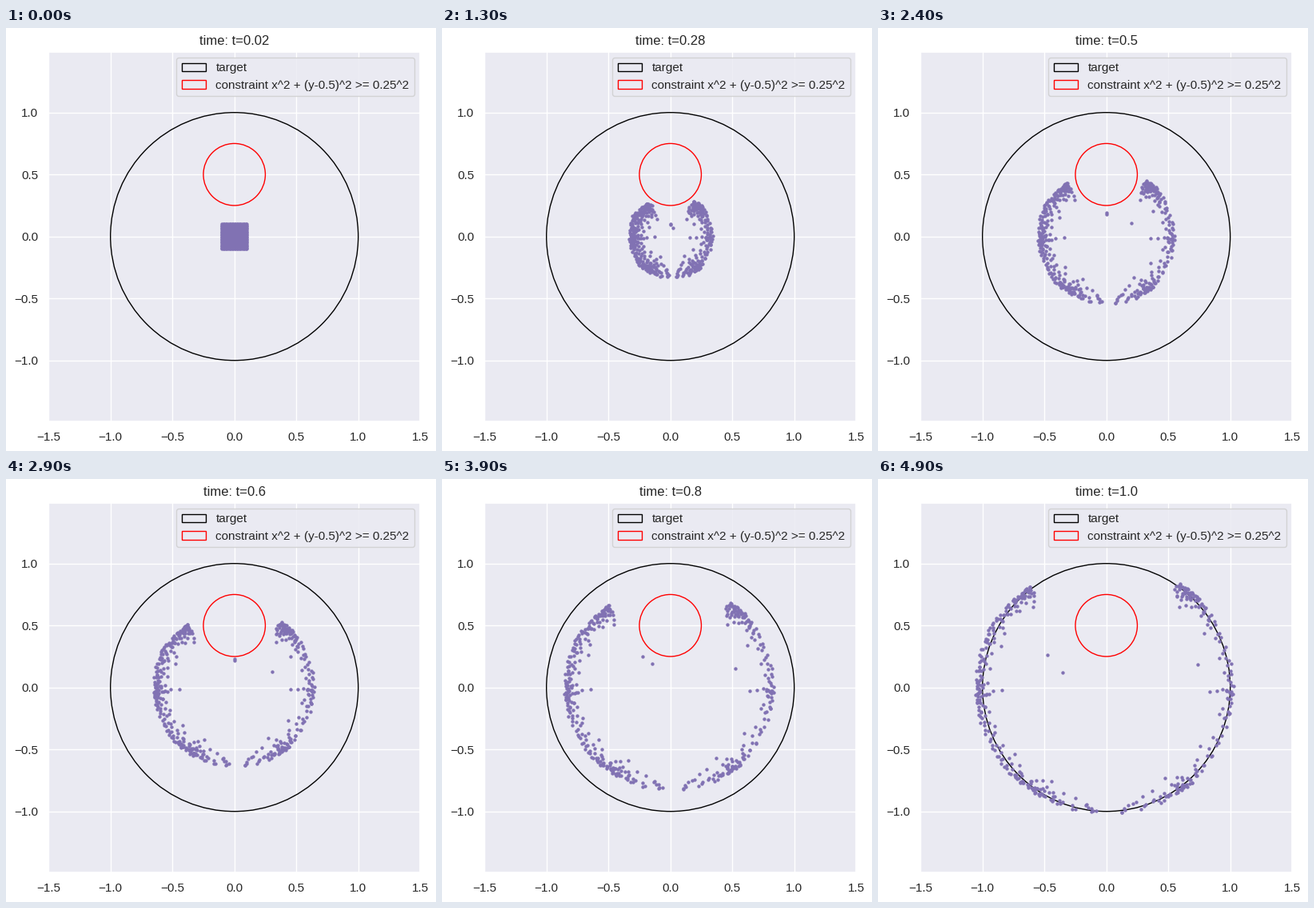
Write a matplotlib script that moves like this. It is 538 px wide and 529 px high and loops after 5000 ms.

```python
import numpy as np
import matplotlib.pyplot as plt
from matplotlib.animation import FuncAnimation

W, H, DPI = 538, 529, 100
FRAMES, INTERVAL, DT = 50, 100, 0.02
LAST = FRAMES - 1
LEFT, BOTTOM, AX_W, AX_H = 53.2, 37.3, 465, 462
SCALE = AX_W / 3
INK = "0.15"
PURPLE = "#8172b3"

plt.rcParams.update({
    "font.family": "Liberation Sans",
    "text.color": INK,
    "axes.facecolor": "#eaeaf2",
    "axes.edgecolor": "white",
    "axes.linewidth": 1.25,
    "axes.axisbelow": True,
    "grid.color": "white",
    "grid.linewidth": 1,
    "patch.linewidth": 1,
    "legend.fontsize": 11,
})

# Particles start on a square grid and flow outwards from a point near its middle.
N = 21
CENTER = np.array([0.015, 0.0])
SOFT = 0.1          # radius below which the flow is slower
KEEP_OUT = 0.29     # distance kept from the middle of the obstacle
OBSTACLE = np.array([0.0, 0.5])

rng = np.random.default_rng(4)
side = np.linspace(-0.1, 0.1, N)
start = np.stack(np.meshgrid(side, side), -1).reshape(-1, 2) - CENTER
count = len(start)
radius0 = np.hypot(*start.T)

# Headings are degrees from straight up, negative to the left. The flow leaves
# a gap behind the obstacle and bunches the rest at even angles.
heading0 = np.degrees(np.arctan2(start[:, 0], start[:, 1]))
gap = np.where(heading0 > 0, 28, 35)
spread = gap + (176 - gap) * (np.abs(heading0) / 180) ** 1.25
spread -= 5 * np.sin(2 * np.pi * (spread - 40) / 53)
heading1 = np.sign(heading0) * spread + rng.normal(0, 0.9, count)
turn_frames = rng.uniform(15, 22, count)
radius_jitter = rng.normal(0, 0.006, count)

leftness = np.maximum(0, -np.sin(np.radians(heading1))) ** 2
speed = 0.95 + 0.06 * leftness
reach = (start ** 4).sum(axis=1) ** 0.25
reach = SOFT * (reach / SOFT) ** 0.6 * (1 - 0.15 * leftness)

# Three stragglers drift to a resting point, then leave in a straight line.
REST = np.array([(0, 0.24), (0, 0.24), (0.03, 0.085)])
END = np.array([(-0.475, 0.26), (-0.35, 0.12), (0.735, 0.185)])
LEAVE = np.array([[30], [32], [16]])


def stragglers(frame):
    drift = np.clip(frame / LEAVE, 0, 1)
    gone = np.clip((frame - LEAVE) / (LAST - LEAVE), 0, 1)
    return REST * drift + (END - REST) * gone


def particles(frame):
    turned = 1 - (1 - np.minimum(frame / turn_frames, 1)) ** 2
    growth = np.exp(speed * DT * frame / SOFT)
    radius = SOFT * np.arcsinh(np.sinh(reach / SOFT) * growth)
    radius += (1 - turned) * (radius0 - reach) + turned * radius_jitter
    angle = np.radians(heading0 + turned * (heading1 - heading0))
    pos = CENTER + radius[:, None] * np.stack([np.sin(angle), np.cos(angle)], -1)

    # Slide around the obstacle.
    away = pos - OBSTACLE
    dist = np.hypot(*away.T)[:, None]
    pos = np.where(dist < KEEP_OUT, OBSTACLE + away / dist * KEEP_OUT, pos)
    return np.vstack([pos, stragglers(frame)])


fig = plt.figure(figsize=(W / DPI, H / DPI), dpi=DPI, facecolor="white")
ax = fig.add_axes([LEFT / W, BOTTOM / H, AX_W / W, AX_H / H])
ax.set_xlim(-1.5, 1.5)
ax.set_ylim(-AX_H / 2 / SCALE, AX_H / 2 / SCALE)
ax.set_xticks(np.arange(-1.5, 1.6, 0.5))
ax.set_yticks(np.arange(-1, 1.1, 0.5))
ax.tick_params(length=0, pad=9.5, labelsize=11, labelcolor=INK)
ax.grid(True)

ax.add_patch(plt.Circle((0, 0), 1, fill=False, ec="black", label="target"))
ax.add_patch(plt.Circle(OBSTACLE, 0.25, fill=False, ec="red",
                        label="constraint x^2 + (y-0.5)^2 >= 0.25^2"))
ax.legend(loc="upper right")
dots, = ax.plot([], [], "o", color=PURPLE, ms=3.16, mew=0)
title = ax.set_title("", fontsize=12, pad=6)


def update(frame):
    dots.set_data(*particles(frame).T)
    title.set_text(f"time: t={round(DT * (frame + 1), 2)}")
    return dots, title


anim = FuncAnimation(fig, update, frames=FRAMES, interval=INTERVAL,
                     repeat=True, repeat_delay=0)
plt.show()
```
